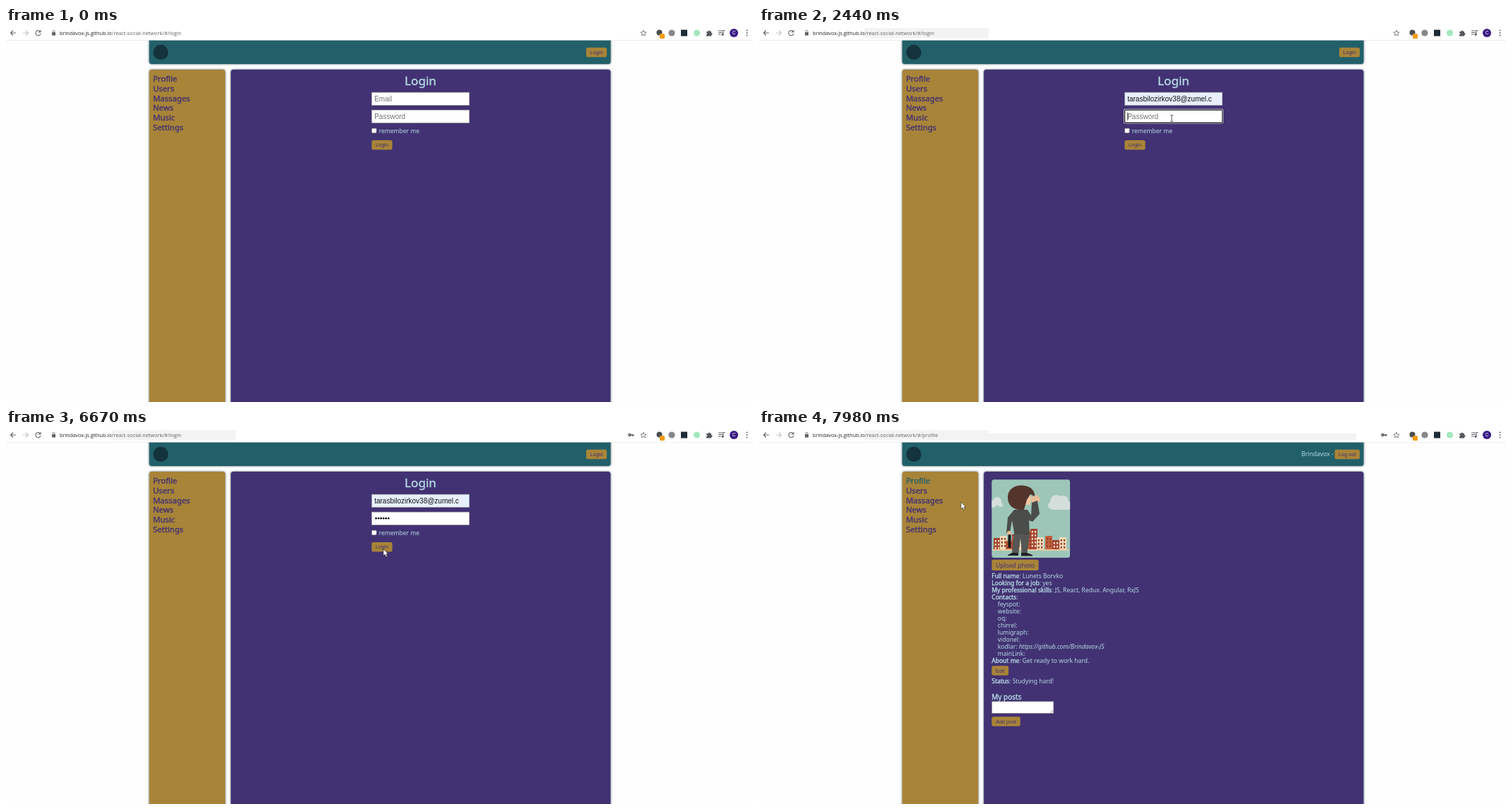
Recreate the animation shown at these times as an HTML page. Size 1057 by 530 pixels, loop 8000 ms.

```html
<!DOCTYPE html>
<html lang="en">
<head>
<meta charset="utf-8">
<title>Login demo</title>
<style>
html, body { margin: 0; width: 100%; height: 100%; overflow: hidden; background: #fefefe; }
svg { display: block; width: 1057px; height: 530px; }
text { fill: currentColor; font: 8.5px "Noto Sans", sans-serif; white-space: pre; }
.b { stroke: currentColor; stroke-width: .35px; }
.ui { font-family: "Liberation Sans", Arial, sans-serif; }
.url { font: 7.3px "Open Sans", sans-serif; }
.line { fill: none; stroke: #5f6368; stroke-width: 1.1; }
</style>
</head>
<body>
<svg id="stage" viewBox="0 0 1057 530"></svg>
<script>
const TEAL = '#246069', GOLD = '#a88439', PURPLE = '#423073', PALE = '#b5d9e4';
const EMAIL = 'tarasbilozirkov38@zumel.c';

const text = (x, y, str, size = 8.5, cls = '', extra = '') =>
  `<text x="${x}" y="${y}" class="${cls}" style="font-size:${size}px" ${extra}>${str}</text>`;
const rect = (x, y, w, h, fill, r = 0, extra = '') =>
  `<rect x="${x}" y="${y}" width="${w}" height="${h}" rx="${r}" fill="${fill}" ${extra}/>`;
const circle = (x, y, r, fill) => `<circle cx="${x}" cy="${y}" r="${r}" fill="${fill}"/>`;
const path = (d, fill) => `<path d="${d}" fill="${fill}"/>`;
const group = (id, body, color = PALE) => `<g id="${id}" color="${color}">${body}</g>`;
const button = (x, y, w, label) => rect(x, y, w, 13.6, GOLD, 2.5) +
  text(x + w / 2, y + 9.4, label, 7.35, 'ui', `text-anchor="middle" color="${PURPLE}"`);
const panel = (x, y, w, h, fill) => rect(x, y, w, h, fill, 3.5, 'filter="url(#glow)"');
const field = (y, id) => rect(517.6, y, 138, 18.4, '#fff', 0, `id="${id}" stroke="#999" stroke-width=".7"`);
const ring = (id, y) => group(id,
  rect(517, y, 139.2, 19.2, 'none', 1.5, 'stroke="#fff" stroke-width="1.6"') +
  rect(517.5, y + .5, 138.2, 18.2, 'none', 1, 'stroke="#101010" stroke-width="1.2"'));
const item = (y, label, value = '', x = 329.3) =>
  `<text x="${x}" y="${y}"><tspan class="${x < 330 ? 'b' : ''}">${label}</tspan>: ${value}</text>`;

function browserBar() {
  return rect(0, 0, 1057, 17, '#fff') + rect(0, 17, 1057, .6, '#e4e4e6') +
    group('hover', rect(149, 0, 176, 14.5, '#f3f3f4')) +
    group('hoverWide', rect(209, 4.5, 636, 10, '#f3f3f4')) +
    `<path class="line" d="M14 7H6.5M10 3.5L6.5 7L10 10.500"/>
    <path class="line" style="stroke:#c4c6c8" d="M24 7H31.500M28 3.500L31.500 7L28 10.500"/>
    <path class="line" d="M48 4.500A3.600 3.600 0 1 0 49 8M49 3V5.600H46"/>
    <path class="line" style="stroke-width:.8" d="M66 6.500V4.800a1.500 1.500 0 0 1 3 0V6.500"/>` +
    rect(65, 6, 5, 4.5, '#5f6368', .6) +
    `<text id="address" class="url" x="76" y="10" color="#202124">brindavox-js.github.io<tspan fill="#5f6368">/react-social-network/#/<tspan id="route"></tspan></tspan></text>` +
    group('key', circle(882.3, 7, 2.2, '#4d5156') + circle(882, 7, .8, '#fff') +
      path('M884 6.300H888.500V7.700H887.800V9H886.400V7.700H884Z', '#4d5156')) +
    '<path class="line" style="stroke-width:.8" d="M902 3.200L903.100 5.900L906 6.100L903.800 8L904.500 10.900L902 9.300L899.500 10.900L900.200 8L898 6.100L900.900 5.900Z"/>' +
    circle(924.5, 6.5, 4, '#4a4d52') + rect(925, 8.3, 7, 6.8, '#f59b0c', 1) +
    circle(942, 7, 4.6, '#85878a') + rect(955, 2.5, 9, 9, '#1d2b36') +
    circle(977.5, 7, 4.6, '#a4e8bd') +
    path('M991 5H993.500a1.500 1.500 0 0 1 3 0H998V7a1.500 1.500 0 0 1 0 3V11.500H991V9a1.200 1.200 0 0 0 0-2.400Z', '#55595e') +
    '<path class="line" d="M1008 4H1014M1008 6.500H1014M1008 9H1011.500M1015 9V3.500H1017.500"/>' +
    circle(1014, 9.3, 1.5, '#55595e') + circle(1030, 7, 6, '#3b1c86') +
    text(1030, 9.3, 'C', 6.5, 'ui', 'text-anchor="middle" color="#fff"') +
    [3.5, 7, 10.5].map(y => circle(1048.5, y, .9, '#55595e')).join('');
}

function picture() {
  const town = [332, 341, 349, 358, 365, 376, 384, 393, 405, 415, 425].map((x, i) => {
    const h = [17, 20, 13, 22, 15, 27, 30, 18, 20, 14, 18][i];
    let s = rect(x, 170 - h, 10, h, ['#a54432', '#efd9b7', '#c0603c'][i % 3]);
    for (let y = 173 - h; y < 168; y += 5)
      s += rect(x + 1.7, y, 2.2, 2.6, i % 3 ? '#96402f' : '#f2dfbf') + rect(x + 6, y, 2.2, 2.6, i % 3 ? '#96402f' : '#f2dfbf');
    return s;
  }).join('');
  return `<g clip-path="url(#photo)">` + rect(329, 70, 111.5, 111.5, '#9dc6b9') +
    [[414, 107, 5], [421, 101, 9], [430, 101, 8], [437, 107, 6], [331, 105, 5], [337, 101, 6], [342, 106, 3]]
      .map(c => circle(...c, '#d4dedb')).join('') + rect(412, 105, 29, 8, '#d4dedb', 4) +
    town + rect(330, 169, 108, 2, '#e7c99f') +
    path('M384 95L395 92L398 100L388 107Z', '#e9bd98') +
    path('M361 113L380 113L385 121L386 103L394 100L397 119L387 130L382 128L383 149L379 176H372L370 151L367 175H358L361 145L358 128L355 146H350L352 124Z', '#4b4d4a') +
    path('M361 147L383 149L379 176H372L370 151L367 175H358Z', '#565755') +
    path('M370 106H384L385 96L380 88L368 95Z', '#efc6a0') +
    path('M352 96C352 82 365 77 376 79C385 80 391 87 390 94L384 91L379 99L375 113C364 115 352 109 352 96Z', '#54352b') +
    circle(354, 146, 3, '#e9bd98') + rect(352.5, 148, 4, 19, '#191919', 1) +
    path('M352 177L358 174H367V178H352Z M371 174H379L387 177V178.500H371Z', '#222') + '</g>';
}

function loginPage() {
  return text(586.5, 81.3, 'Login', 17.1, 'b', 'text-anchor="middle"') +
    field(91.2, 'emailBox') + field(116.2, 'passBox') + ring('emailRing', 90.6) + ring('passRing', 115.6) +
    text(521.2, 103.7, '', 10, 'ui', 'id="email" clip-path="url(#fieldClip)"') +
    text(521.2, 128.7, 'Password', 10, 'ui', 'id="passHint" color="#757575"') +
    group('dots', [0, 1, 2, 3, 4, 5].map(i => circle(523.6 + 3.55 * i, 125.2, 1.35, '#111')).join('')) +
    '<rect id="caret" width=".8" height="11" fill="#111"/>' +
    rect(517.6, 142.2, 6.6, 6.6, '#fff', 1, 'stroke="#777" stroke-width=".5"') +
    text(527.7, 148.7, 'remember me') +
    group('error', rect(517.8, 156.7, 137.7, 16.4, 'none', 0, 'stroke="#b5303a" stroke-width="1.3"') +
      text(521.5, 168.1, 'Incorrect Email or Password'), '#b5303a') +
    group('submit', button(517.4, 159, 29.2, 'Login')) +
    group('suggest', rect(517.5, 111, 138.5, 128.5, '#fff', 1, 'stroke="#c8c8c8" stroke-width=".5"') +
      rect(517.8, 114, 138, 21, '#e8e8e9', 0, 'id="pick"') +
      [EMAIL + 'om', 'bilozirkov@zumel.com', 'taras.test@zumel.com', 'demo38@zumel.com', 'Manage...']
        .map((s, i) => text(524, 127 + 24 * i, s, 7.5, 'ui')).join(''), '#333');
}

function profilePage() {
  const links = ['feyspot', 'website', 'oq', 'chirrel', 'lumigraph', 'vidonel', 'kodlar', 'mainLink'];
  return group('loader', `<g fill="none" stroke-width="4.4">
      <circle id="goldRing" cx="586.9" cy="174.5" stroke="${GOLD}"/>
      <circle id="tealRing" cx="586.9" cy="174.5" stroke="${TEAL}"/></g>`) +
    group('details', picture() + rect(329.3, 183.7, 66.4, 15.4, GOLD, 2.5) +
      text(362.5, 194.5, 'Upload photo', 8.5, '', `text-anchor="middle" color="${PURPLE}"`) +
      item(210.2, 'Full name', 'Lunets Borvko') + item(220.2, 'Looking for a job', 'yes') +
      item(230.1, 'My professional skills', 'JS, React, Redux. Angular, RxJS') + item(240.1, 'Contacts') +
      links.map((name, i) => item(250 + 9.95 * i, name,
        name === 'kodlar' ? '<tspan font-style="italic">https://github.com/Brindavox-JS</tspan>' : '', 337.8)).join('') +
      item(329.7, 'About me', 'Get ready to work hard.') + button(329.3, 334.2, 23.8, 'Edit') +
      item(359.2, 'Status', 'Studying hard!')) +
    group('posts', text(329.3, 299.5, 'My posts', 10, 'b') +
      rect(329.6, 302.8, 87.2, 16.6, '#fff', 0, 'stroke="#888" stroke-width=".6"') +
      '<path d="M412 318.500L416 314.500M414.300 318.500L416 316.800" stroke="#777" stroke-width=".6"/>' +
      button(329.3, 324.2, 40.4, 'Add post'));
}

const stage = document.getElementById('stage');
stage.innerHTML = `<defs>
  <filter id="glow" x="-10%" y="-20%" width="120%" height="140%"><feDropShadow dx="0" dy="0" stdDeviation="1.5" flood-color="#2f4b55" flood-opacity=".9"/></filter>
  <clipPath id="photo"><rect x="329.300" y="70.300" width="110.800" height="110.800" rx="3.500"/></clipPath>
  <clipPath id="fieldClip"><rect x="519" y="92" width="133" height="17"/></clipPath></defs>` +
  rect(0, 0, 1057, 530, '#fefefe') +
  panel(202.7, 12, 652.8, 39, TEAL) + panel(202.7, 59, 107.5, 490, GOLD) + panel(318.2, 59, 537.2, 490, PURPLE) +
  browserBar() + circle(219, 34.4, 10.6, '#14333c') +
  group('guest', button(820.9, 27.7, 29.2, 'Login')) +
  group('member', text(812.8, 37.3, 'Brindavox -', 8.5, '', 'text-anchor="end"') + button(814.6, 27.7, 35.5, 'Log out')) +
  group('menu', ['Profile', 'Users', 'Massages', 'News', 'Music', 'Settings']
    .map((s, i) => text(208, 75.9 + 13.86 * i, s, 11.3, 'b')).join(''), PURPLE) +
  group('loginPage', loginPage()) + group('profilePage', profilePage()) +
  group('arrow', '<path d="M0 0V9.600L2.200 7.600L3.800 11L5.500 10.200L4 7H6.900Z" fill="#fff" stroke="#222" stroke-width=".6"/>') +
  group('beam', '<path d="M-1.800-4.500H-.6L0-4L.6-4.500H1.800M0-4V4M-1.800 4.500H-.6L0 4L.6 4.500H1.800" fill="none" stroke="#fff" stroke-width="1.500" opacity=".45"/>' +
    '<path d="M-1.800-4.500H-.6L0-4L.6-4.500H1.800M0-4V4M-1.800 4.500H-.6L0 4L.6 4.500H1.800" fill="none" stroke="#222" stroke-width=".8"/>');

const $ = id => document.getElementById(id);
const show = (id, on) => $(id).style.display = on ? '' : 'none';
const within = (t, a, b) => t >= a && t < b;

// time, x, y
const MOVES = [
  [570, 150, -2], [620, 317, 3], [790, 590, 70], [880, 647, 98], [1170, 576, 109],
  [1540, 576, 109], [1720, 580, 122], [2000, 580, 122], [2170, 584, 128],
  [3660, 584, 128], [3960, 532, 166], [4090, 532, 166], [4310, 540, 164],
  [4910, 540, 164], [5250, 545, 126], [6240, 545, 126], [6590, 534, 168.7],
  [7720, 534, 168.7], [7980, 285.8, 102.3]
];
function pointer(t) {
  const i = MOVES.findIndex(m => m[0] > t);
  if (i < 0) return MOVES[MOVES.length - 1].slice(1);
  const a = MOVES[Math.max(0, i - 1)], b = MOVES[i];
  const k = Math.max(0, (t - a[0]) / (b[0] - a[0])), s = k * k * (3 - 2 * k);
  return [a[1] + (b[1] - a[1]) * s, a[2] + (b[2] - a[2]) * s];
}

function bezier(x1, y1, x2, y2, x) {
  const curve = (p, q, s) => 3 * (1 - s) ** 2 * s * p + 3 * (1 - s) * s * s * q + s ** 3;
  let lo = 0, hi = 1;
  for (let i = 0; i < 24; i++) {
    const mid = (lo + hi) / 2;
    curve(x1, x2, mid) < x ? lo = mid : hi = mid;
  }
  return curve(y1, y2, lo);
}
function ripple(id, t) {
  const phase = (t % 1000) / 1000;
  $(id).setAttribute('r', 88.7 * bezier(0, .2, .8, 1, phase));
  $(id).setAttribute('opacity', 1 - bezier(.2, 0, .8, 1, phase));
}

function draw(t) {
  const member = t >= 6820, loaded = t >= 7185;
  show('hover', t >= 600);
  show('hoverWide', member);
  show('key', t >= 3300);
  show('guest', !member);
  show('member', member);
  show('loginPage', !member);
  show('profilePage', member);
  show('loader', !loaded);
  show('details', loaded);
  $('posts').setAttribute('transform', `translate(0 ${loaded ? 82 : 0})`);
  $('route').textContent = member ? 'profile' : 'login';
  $('menu').firstChild.setAttribute('color', member ? TEAL : PURPLE);
  ripple('goldRing', t - 6604);
  ripple('tealRing', t - 6104);

  const filled = t >= 1690;
  $('email').textContent = filled ? EMAIL : 'Email';
  $('email').setAttribute('color', filled ? '#111' : '#757575');
  $('emailBox').setAttribute('fill', filled ? '#e8f0fe' : '#fff');
  const emailFocus = within(t, 1370, 2440);
  const passFocus = within(t, 2440, 4200) || within(t, 5220, 6600);
  show('emailRing', emailFocus);
  show('passRing', passFocus);
  show('suggest', within(t, 1370, 2140));
  show('pick', t >= 1630);

  const typed = [3240, 3440, 5570, 5720, 5970, 6180].filter(at => t >= at).length;
  [...$('dots').children].forEach((dot, i) => dot.style.display = i < typed ? '' : 'none');
  show('passHint', !typed);
  show('caret', within(t, 1370, 1870) || within(t, 2440, 2940) || within(t, 3240, 3940) || within(t, 5220, 6600));
  $('caret').setAttribute('x', 521.4 + 3.55 * typed);
  $('caret').setAttribute('y', emailFocus ? 95 : 119.8);

  const failed = within(t, 4460, 5570);
  show('error', failed);
  $('submit').setAttribute('transform', `translate(0 ${failed ? 17.8 : 0})`);

  const [x, y] = pointer(t);
  const visible = t >= 580 && !within(t, 2970, 3680) && !within(t, 5570, 6250);
  const overField = x > 517 && x < 656 && (y > 91 && y < 110 || y > 116 && y < 135 && !within(t, 1370, 2140));
  const overText = !member && (overField || failed && y > 156);
  show('beam', visible && overText);
  show('arrow', visible && !overText);
  for (const id of ['beam', 'arrow']) $(id).setAttribute('transform', `translate(${x} ${y})`);
}

function tick() {
  draw(performance.now() % 8000);
  requestAnimationFrame(tick);
}
tick();
</script>
</body>
</html>
```
